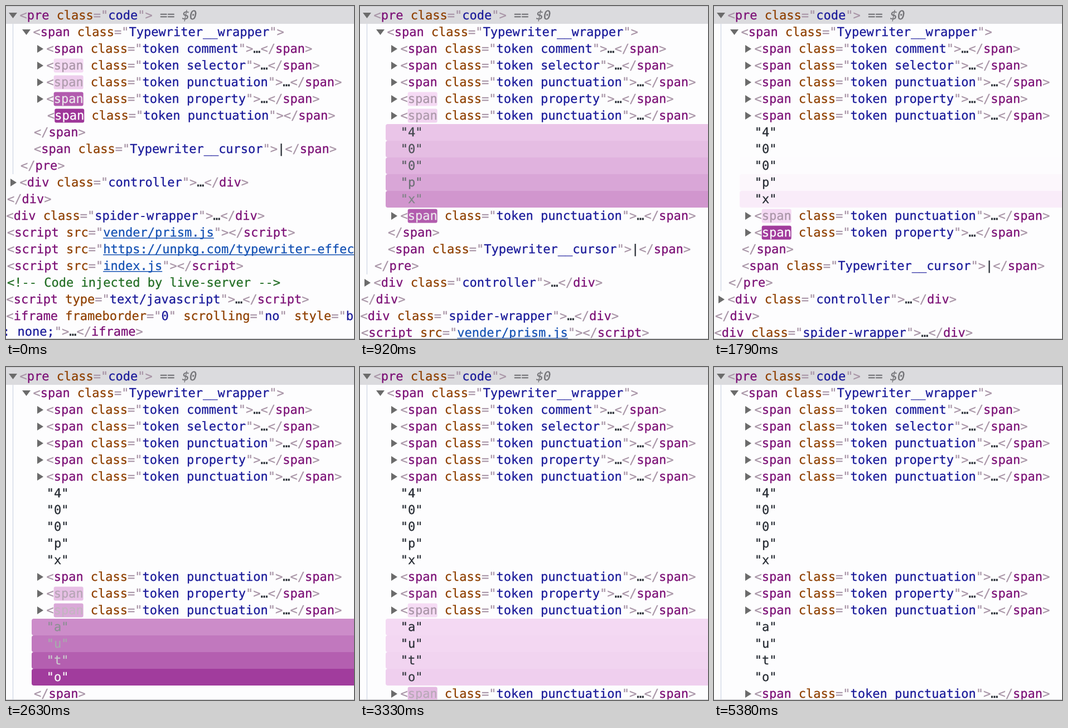
Write an HTML page with a canvas that moves like this. It is 624 by 598 pixels and loops after 5.43 s.

```html
<!DOCTYPE html>
<html lang="en">
<head>
<meta charset="utf-8">
<title>Element tree</title>
<style>
html, body { margin: 0; width: 100%; height: 100%; overflow: hidden; background: #fdfdfe; }
canvas { display: block; }
</style>
</head>
<body>
<canvas id="stage" width="624" height="598"></canvas>
<script>
const ctx = document.getElementById('stage').getContext('2d');
const W = 624, H = 598, ROW = 30, TOP = 2;
const LOOP = 5430, STEP = 1000 / 24, LAST = 129;
const FONT = '22px "DejaVu Sans Mono", "Liberation Mono", monospace';
const C = {
  bg: '#fdfdfe', mark: '#a894a6', tag: '#7c1076', attr: '#8f4000', value: '#1a1a9a',
  text: '#262b33', link: '#1552b4', note: '#236e25', arrow: '#6b6b6b', dim: '#727276',
  hot: '#9e3699', pale: '#f5dbf4', white: '#ffffff', chosen: '#dbdbde', guide: '#c6cde0', edge: '#c2c2c6'
};

// A changed node flashes: hot to pale, then pale to nothing, each easing out
const FLASH = 1370, COOL = FLASH * 0.8;

// cubic-bezier(0, 0, 0.2, 1)
function easeOut(x) {
  let lo = 0, hi = 1;
  for (let i = 0; i < 20; i++) {
    const s = (lo + hi) / 2;
    if (0.6 * (1 - s) * s * s + s ** 3 < x) lo = s;
    else hi = s;
  }
  return 3 * (1 - lo) * lo * lo + lo ** 3;
}

const rgb = hex => [1, 3, 5].map(i => parseInt(hex.slice(i, i + 2), 16));

function mix(a, b, k) {
  const to = rgb(b);
  return 'rgb(' + rgb(a).map((v, i) => Math.round(v + (to[i] - v) * k)) + ')';
}

function flash(age, from, mid, to) {
  if (age >= FLASH) return to;
  return age < COOL
    ? mix(from, mid, easeOut(age / COOL))
    : mix(mid, to, easeOut((age - COOL) / (FLASH - COOL)));
}
const glow = age => flash(age, C.hot, C.pale, C.bg);

// Segments are [text, colour, extra]
const open = (name, attrs = {}, cut) => {
  const out = [['<', C.mark], [name, C.tag, 'name']];
  for (const [key, val] of Object.entries(attrs)) {
    const url = key === 'src';
    out.push([' ' + key, C.attr], ['="', C.mark], [val, url ? C.link : C.value, url && 'link'], ['"', C.mark]);
  }
  if (cut) out.pop();
  else out.push(['>', C.mark]);
  return out;
};
const close = name => [['</', C.mark], [name, C.tag], ['>', C.mark]];
const full = (name, attrs, inner) => [...open(name, attrs), [inner, C.text], ...close(name)];
const line = (depth, segs, arrow = '', more = {}) => ({ depth, segs, arrow, ...more });
const script = src => line(0, full('script', { src }, ''));

const head = [
  line(1, [...open('pre', { class: 'code' }), [' == ', C.dim], ['$0', C.dim, 'italic']], 'down'),
  line(2, open('span', { class: 'Typewriter__wrapper' }), 'down')
];
const tail = [
  line(2, close('span')),
  line(2, full('span', { class: 'Typewriter__cursor' }, '|')),
  line(1, close('pre'), '', { lineEnd: true }),
  line(1, full('div', { class: 'controller' }, '…'), 'right'),
  line(0, close('div')),
  line(0, full('div', { class: 'spider-wrapper' }, '…'), 'right'),
  script('vender/prism.js'),
  script('https://unpkg.com/typewriter-effect'),
  script('index.js'),
  line(0, [['<!-- Code injected by live-server -->', C.note]]),
  line(0, full('script', { type: 'text/javascript' }, '…'), 'right'),
  line(0, open('iframe', { frameborder: '0', scrolling: 'no', style: 'b' }, true), 'right'),
  line(0, [[': none;', C.value], ['">', C.mark], ['…', C.text], ...close('iframe')], '', { dx: -8, dy: -2 })
];

// A token flashes at each hit; a fresh one is empty until its second hit
const token = (kind, hits = [], born = -1e4, filled = born) => ({ kind, hits, born, filled });
const fresh = (kind, ...hits) => token(kind, hits, hits[0], hits[1]);
const series = (n, start, gap) => Array.from({ length: n }, (_, i) => start + i * gap);
const typed = (text, start, gap) =>
  series(text.length, start, gap).map((born, i) => ({ ch: text[i], born, hits: [born] }));

const typing = [
  token('comment'),
  token('selector', [-960]),
  token('punctuation', [-700]),
  token('property', [-75]),
  fresh('punctuation', 0, 120),
  ...typed('400px', 320, 80),
  fresh('punctuation', 745, 840),
  fresh('property', 1110, ...series(10, 1190, 99)),
  fresh('punctuation', 2160, 2250),
  ...typed('auto', 2390, 75),
  fresh('punctuation', 2750, 2840)
];

function typedLine(item, t) {
  const hit = item.hits.filter(h => h <= t).pop() ?? -1e4;
  const age = t - hit;
  if (item.ch) {
    const ink = flash(age, C.white, C.text, C.text);
    return line(3, [['"' + item.ch + '"', ink]], '', { bar: age, dx: -1.2 });
  }
  const filled = t >= item.filled;
  const segs = full('span', { class: 'token ' + item.kind }, filled ? '…' : '');
  segs[1] = ['span', flash(age, C.white, C.mark, C.tag), 'name'];
  return line(3, segs, filled ? 'right' : '', { box: age });
}

function fill(color, x, y, w, h, r = 0) {
  ctx.fillStyle = color;
  ctx.beginPath();
  ctx.roundRect(x, y, w, h, r);
  ctx.fill();
}

function drawArrow(kind, depth, y) {
  const x = depth * 24;
  const pts = kind === 'down'
    ? [[x - 19, y + 10], [x - 4, y + 10], [x - 11.5, y + 20]]
    : [[x - 16, y + 8], [x - 16, y + 22], [x - 5, y + 15]];
  ctx.fillStyle = C.arrow;
  ctx.beginPath();
  pts.forEach(p => ctx.lineTo(...p));
  ctx.fill();
}

function drawLine(row, y) {
  if (row.bar < FLASH) fill(glow(row.bar), 46, y, W - 46, ROW, [4, 0, 0, 4]);
  if (row.arrow) drawArrow(row.arrow, row.depth, y);
  let x = row.depth * 24 + (row.arrow ? 0.4 : 2) + (row.dx || 0);
  const base = y + 22 + (row.dy || 0);
  for (const [text, color, extra] of row.segs) {
    ctx.font = (extra === 'italic' ? 'italic ' : '') + FONT;
    const w = ctx.measureText(text).width;
    if (extra === 'name' && row.box < FLASH) fill(glow(row.box), x, y + 2.5, w, 25, 3);
    ctx.fillStyle = ctx.strokeStyle = color;
    ctx.fillText(text, x, base);
    ctx.strokeText(text, x, base);
    if (extra === 'link') ctx.fillRect(x, base + 2, w, 1.5);
    x += w;
  }
}

function draw(t) {
  const rows = [...head, ...typing.filter(i => i.born <= t).map(i => typedLine(i, t)), ...tail];
  fill(C.bg, 0, 0, W, H);
  fill(C.chosen, 0, 1, W, ROW + 1);
  fill(C.edge, 0, 0, W, 1);
  const end = rows.findIndex(r => r.lineEnd) + 1;
  fill(C.guide, 12, TOP + ROW, 1, (end - 1) * ROW);
  rows.forEach((row, i) => {
    const y = TOP + i * ROW;
    if (y < H) drawLine(row, y);
  });
  fill(C.edge, 0, H - 1, W, 1);
}

ctx.textRendering = 'geometricPrecision';
ctx.lineWidth = 0.3; // slightly heavier letters
ctx.lineJoin = 'round';
const start = performance.now();

function tick() {
  const t = (performance.now() - start) % LOOP;
  draw(Math.min(LAST, Math.floor((t + 6) / STEP)) * STEP);
  requestAnimationFrame(tick);
}
tick();
</script>
</body>
</html>
```
